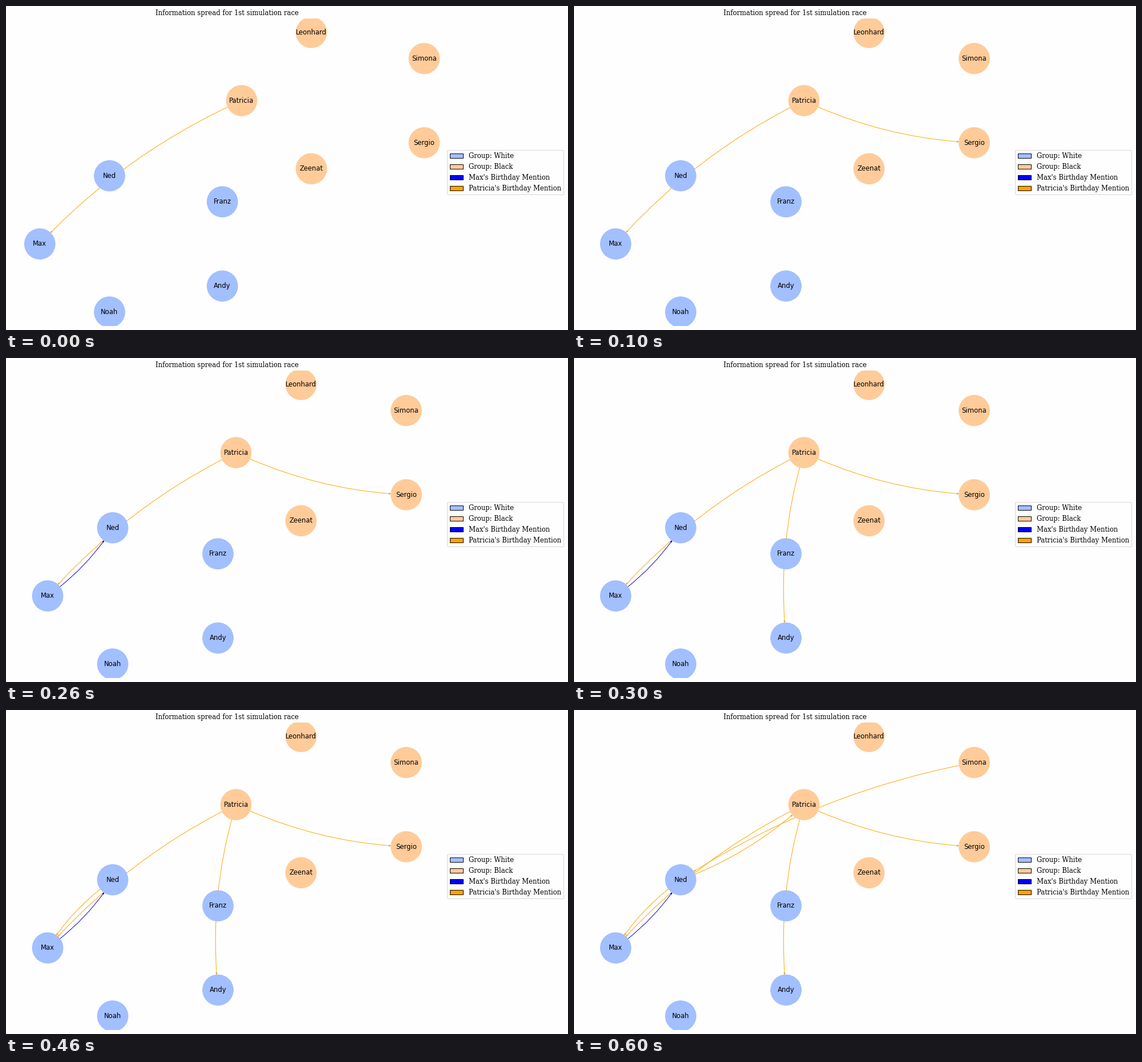
Write a matplotlib script that moves like this. It is 985 by 569 pixels and loops after 0.7 s.

```python
import numpy as np
import matplotlib.pyplot as plt
from matplotlib.animation import FuncAnimation
from matplotlib.patches import FancyArrowPatch, Patch

W, H, DPI = 985, 569, 70
STEPS, INTERVAL = 7, 100
NODE_SIZE = 3000
PALE_BLUE, PALE_ORANGE = "#a2bfff", "#ffcb99"

# Each group is a unit pentagon, listed by angle from 36 degrees in 72 degree steps
BLUE_GROUP = ["Franz", "Ned", "Max", "Noah", "Andy"]
ORANGE_GROUP = ["Simona", "Leonhard", "Patricia", "Zeenat", "Sergio"]

# One new mention per step: speaker, listener, colour
MENTIONS = [
    ("Patricia", "Max", "orange"),
    ("Patricia", "Sergio", "orange"),
    ("Max", "Ned", "blue"),
    ("Patricia", "Andy", "orange"),
    ("Ned", "Max", "orange"),
    ("Simona", "Ned", "orange"),
    ("Ned", "Patricia", "orange"),
]


def pentagon(names, center):
    angles = np.radians(36 + 72 * np.arange(5))
    return {n: (center + np.cos(a), center + np.sin(a)) for n, a in zip(names, angles)}


pos = {**pentagon(BLUE_GROUP, -1), **pentagon(ORANGE_GROUP, 1)}
xs, ys = np.array(list(pos.values())).T


def padded(lo, hi):
    pad = 0.05 * (hi - lo)
    return lo - pad, hi + pad


def x_limits(count):
    """Fit all nodes plus a padded box around the visible edges."""
    ends = [pos[n][0] for a, b, _ in MENTIONS[:count] for n in (a, b)]
    lo, hi = padded(min(ends), max(ends))
    return padded(min(lo, xs.min()), max(hi, xs.max()))


fig = plt.figure(figsize=((W + 1e-6) / DPI, (H + 1e-6) / DPI), dpi=DPI, facecolor="#fefefe")
left, right, top, bottom = 7, 767.5, 22, 562
ax = fig.add_axes([left / W, 1 - bottom / H, (right - left) / W, (bottom - top) / H])
ax.axis("off")
ax.set_title("Information spread for 1st simulation race", family="DejaVu Serif", size=12)

colors = [PALE_BLUE] * 5 + [PALE_ORANGE] * 5
ax.scatter(xs, ys, s=NODE_SIZE, c=colors, linewidths=1.5, zorder=2)
for name, (x, y) in pos.items():
    ax.text(x, y, name, family="DejaVu Sans", size=12, ha="center", va="center",
            clip_on=True, zorder=3)

margin = np.sqrt(NODE_SIZE) / 2
arrows = []
for src, dst, color in MENTIONS:
    arrow = FancyArrowPatch(pos[src], pos[dst], arrowstyle="-|>", mutation_scale=6,
                            connectionstyle="arc3,rad=0.1", shrinkA=margin,
                            shrinkB=margin, color=color, linewidth=1, zorder=1)
    arrows.append(ax.add_patch(arrow))

entries = [
    ("Group: White", PALE_BLUE),
    ("Group: Black", PALE_ORANGE),
    ("Max's Birthday Mention", "blue"),
    ("Patricia's Birthday Mention", "orange"),
]
ax.legend(handles=[Patch(facecolor=c, edgecolor="black", label=t) for t, c in entries],
          loc="center left", bbox_to_anchor=(1, 0.5),
          prop={"family": "DejaVu Serif", "size": 12})
ax.set_ylim(*padded(ys.min(), ys.max()))


def draw(step):
    ax.set_xlim(*x_limits(step + 1))
    for i, arrow in enumerate(arrows):
        arrow.set_visible(i <= step)
    return arrows


anim = FuncAnimation(fig, draw, frames=STEPS, interval=INTERVAL, repeat=True,
                     repeat_delay=0, blit=False)
plt.show()
```
